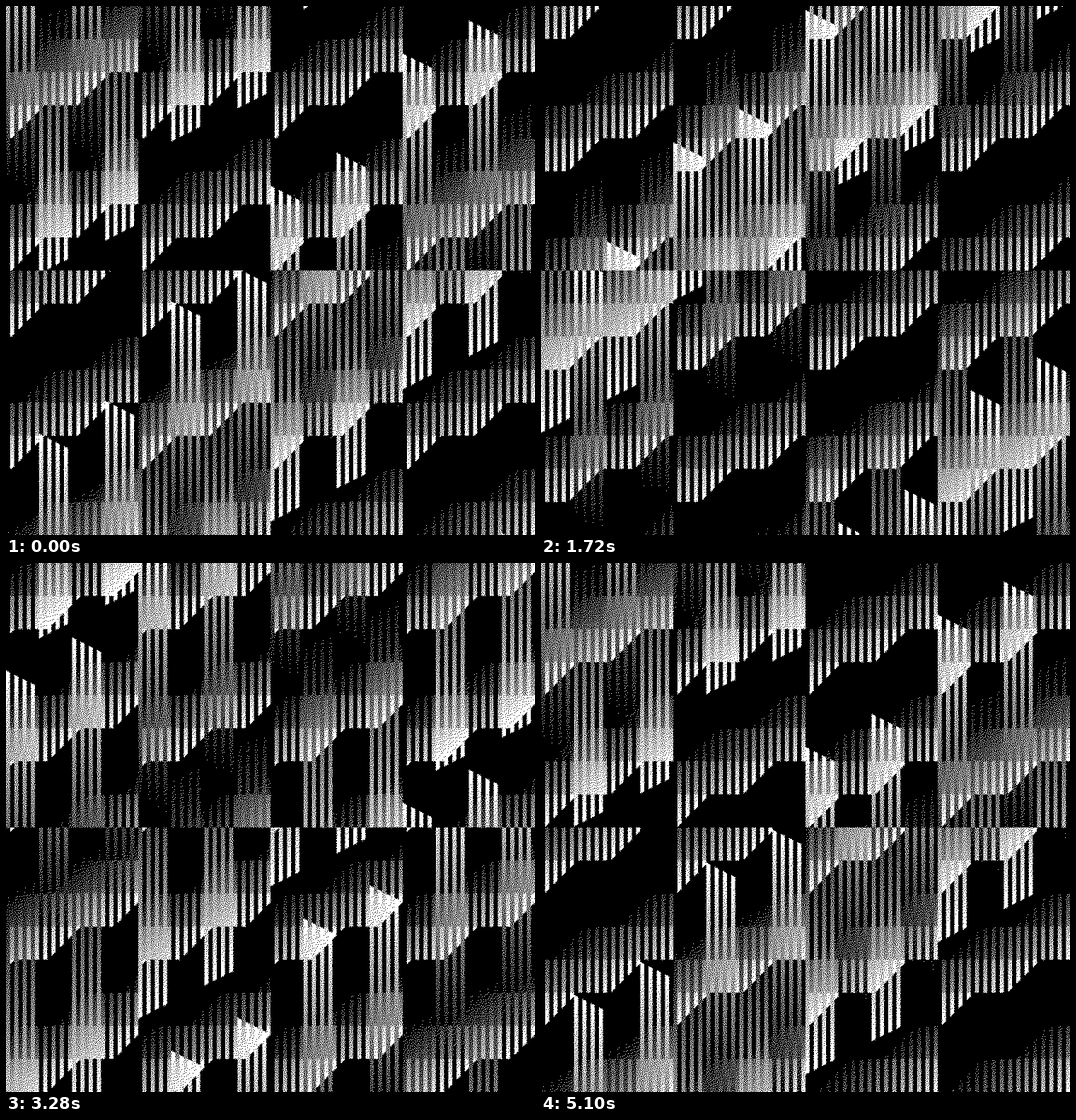
These frames come from a looping animation (748x748 px, 5.12 s). An HTML page with a canvas:

```html
<!DOCTYPE html>
<html lang="en">
<head>
<meta charset="utf-8">
<title>Woven stripes</title>
<style>
  html, body { margin: 0; width: 100%; height: 100%; overflow: hidden; background: #000; }
  canvas { display: block; width: 100%; height: 100%; }
</style>
</head>
<body>
<canvas id="stage" width="748" height="748"></canvas>
<script>
const SIZE = 748, FIELD = 512, LOOP = 5120, STEP = 20;
const BLACK = 0xff000000, WHITE = 0xffffffff;

const fieldCanvas = document.createElement('canvas');
fieldCanvas.width = fieldCanvas.height = FIELD;
const fieldCtx = fieldCanvas.getContext('2d');
const field = fieldCtx.createImageData(FIELD, FIELD);
const fieldPixels = new Uint32Array(field.data.buffer);

const stage = document.getElementById('stage').getContext('2d', { willReadFrequently: true });
stage.imageSmoothingEnabled = true;

const mod256 = n => ((n % 256) + 256) % 256;

// Odd stripes: a staircase of ramps sliding to the right.
function staircase(x, y, t) {
  const sum = y + (y & ~31) + (x & 123) + 32 + (y & 256) / 2 - t;
  return mod256(sum) - 128;
}

// Even stripes: long ramps that run up or down from block to block.
function ramp(x, y, t) {
  const rising = ((x >> 5) ^ (y >> 8)) & 1;
  const shifted = y / 2 + (x & 64) / 4 + (x & 384) / 2 + (y & 256) / 16;
  const distance = rising !== 0 ? 136 - shifted : shifted - 216;
  // Blocks flip direction with both their column and their half of the picture.
  return 128 - mod256(distance - (x & 63) / 4 + t);
}

function drawField(t) {
  for (let y = 0, i = 0; y < FIELD; y++) {
    for (let x = 0; x < FIELD; x++, i++) {
      const value = x & 4 ? staircase(x, y, t) : ramp(x, y, t);
      const grey = Math.min(255, Math.max(0, Math.round(value * 2)));
      fieldPixels[i] = BLACK | grey * 0x010101;
    }
  }
  fieldCtx.putImageData(field, 0, 0);
}

function noise(i, seed) {
  let h = Math.imul(i ^ seed, 0x9e3779b1);
  h = Math.imul(h ^ (h >>> 15), 0x85ebca6b);
  return ((h ^ (h >>> 13)) >>> 0) / 4294967296;
}

// Turns grey into black and white grain by spreading each rounding error.
function grain(pixels, seed) {
  let here = new Float32Array(SIZE + 2), below = new Float32Array(SIZE + 2);
  for (let y = 0, i = 0; y < SIZE; y++) {
    for (let x = 1; x <= SIZE; x++, i++) {
      const grey = pixels[i] & 255;
      if (grey === 0) {
        pixels[i] = BLACK;
        continue;
      }
      const wanted = grey + here[x];
      const lit = wanted > 78 + 100 * noise(i, seed);
      const error = (wanted - (lit ? 255 : 0)) / 16;
      pixels[i] = lit ? WHITE : BLACK;
      here[x + 1] += error * 7;
      below[x - 1] += error * 3;
      below[x] += error * 5;
      below[x + 1] += error;
    }
    [here, below] = [below, here];
    below.fill(0);
  }
}

function draw(t) {
  drawField(t);
  stage.drawImage(fieldCanvas, 0, 0, SIZE, SIZE);
  const image = stage.getImageData(0, 0, SIZE, SIZE);
  grain(new Uint32Array(image.data.buffer), Math.imul(t, 0x27d4eb2f));
  stage.putImageData(image, 0, 0);
}

let shown = -1;
function tick() {
  const t = Math.max(1, Math.floor((performance.now() % LOOP) / STEP));
  if (t !== shown) draw(shown = t);
  requestAnimationFrame(tick);
}
tick();
</script>
</body>
</html>
```
